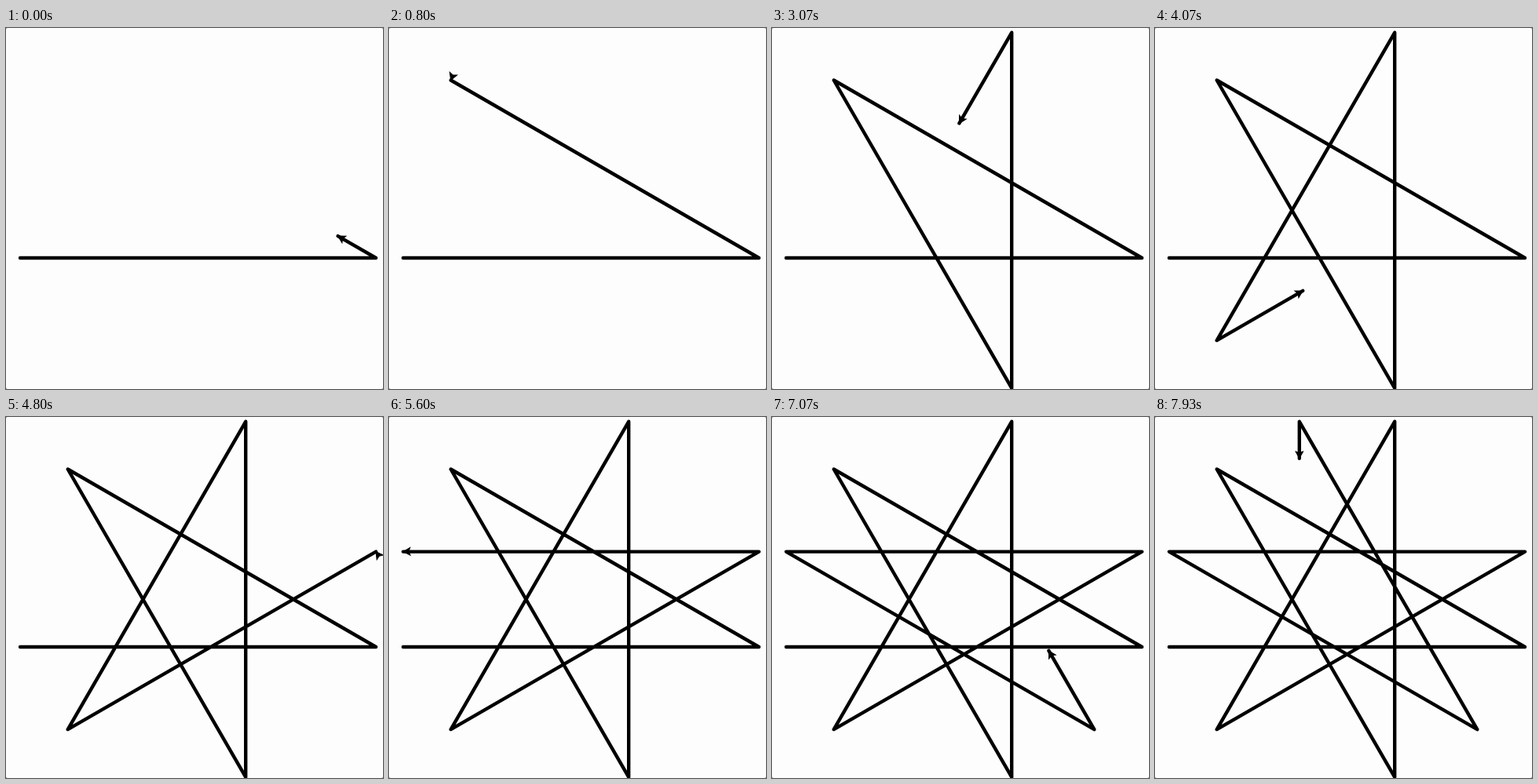
Animation of 480 by 460 pixels, one loop 8000 ms. Source, as an HTML page:

```html
<!DOCTYPE html>
<html lang="en">
<head>
<meta charset="utf-8">
<title>Turtle star</title>
<style>
html, body { margin: 0; width: 100%; height: 100%; overflow: hidden; background: #777; }
svg { display: block; width: 480px; height: 460px; }
</style>
</head>
<body>
<svg viewBox="0 0 480 460">
  <rect width="480" height="460" rx="2" fill="#fefdfe"/>
  <polyline id="trail" fill="none" stroke="#000" stroke-width="4.4" stroke-linecap="round" stroke-linejoin="round"/>
  <path id="turtle" d="M0 0L-9 -5L-7 0L-9 5Z" stroke="#000" stroke-width="1"/>
</svg>
<script>
const LOOP = 8000, FRAME = 1000 / 15;
const SIDE = 453, TURN = 150, DRAW = 640;
// When the turtle sets off along each side; it turns in the time left over.
const starts = [-1075, -79, 925, 1895, 2878, 3888, 4955, 5949, 6903, 7867, 8860];
const trail = document.getElementById('trail');
const turtle = document.getElementById('turtle');

const clamp = v => Math.max(0, Math.min(1, v));

function step([x, y], heading, length) {
  const a = heading * Math.PI / 180;
  return [x + length * Math.cos(a), y - length * Math.sin(a)];
}

function render(ms) {
  const t = Math.floor((ms + 4) / FRAME) * FRAME;
  let pos = [18, 293], heading = 0;
  const points = [pos];
  for (let i = 0; i < starts.length - 1 && starts[i] <= t; i++) {
    const end = starts[i] + DRAW;
    pos = step(pos, heading, SIDE * clamp((t - starts[i]) / DRAW));
    points.push(pos);
    heading += TURN * clamp((t - end) / (starts[i + 1] - end));
  }
  trail.setAttribute('points', points.map(p => p.map(v => v.toFixed(2)).join()).join(' '));
  turtle.setAttribute('transform', `translate(${pos}) rotate(${-heading})`);
}

const origin = performance.now();
function tick() {
  render((performance.now() - origin) % LOOP);
  requestAnimationFrame(tick);
}
tick();
</script>
</body>
</html>
```
